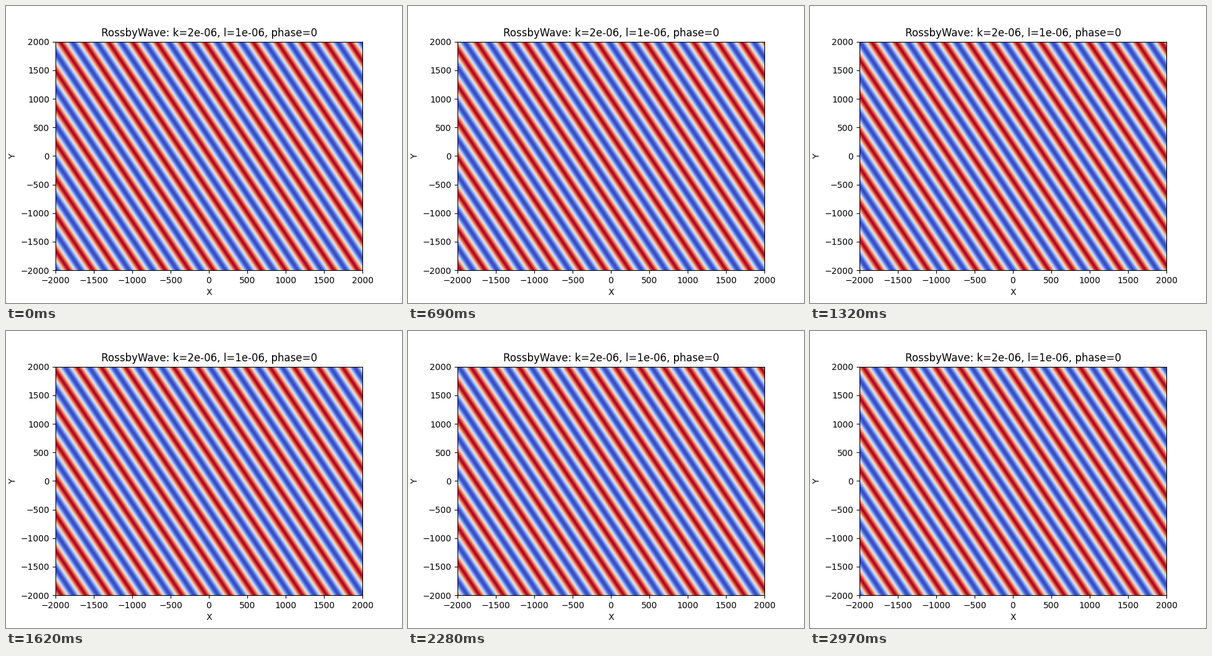
A matplotlib script for the animation above (3000 ms loop, 640 by 480 pixels).

```python
import numpy as np
import matplotlib.pyplot as plt
from matplotlib.animation import FuncAnimation

FRAMES, INTERVAL = 100, 30
HALF = 2000            # half width of the domain
K, L = 0.02, 0.01      # wavenumbers per axis unit
OMEGA = -0.384         # phase change per frame, westward

# Sample at cell centres, about one cell per pixel.
NX, NY = 496, 370
x = (np.arange(NX) + 0.5) / NX * 2 * HALF - HALF
y = (np.arange(NY) + 0.5) / NY * 2 * HALF - HALF
theta = K * x[None, :] + L * y[:, None]


def wave(i):
    return np.cos(theta - OMEGA * i)


fig, ax = plt.subplots(figsize=(6.4, 4.8), dpi=100)
im = ax.imshow(wave(0), cmap="coolwarm", vmin=-1, vmax=1, origin="lower",
               extent=(-HALF, HALF, -HALF, HALF), aspect="auto",
               interpolation="nearest")
ax.set_title("RossbyWave: k=2e-06, l=1e-06, phase=0")
ax.set_xlabel("X")
ax.set_ylabel("Y")
ticks = np.arange(-HALF, HALF + 1, 500)
ax.set_xticks(ticks)
ax.set_yticks(ticks)


def update(i):
    im.set_data(wave(i))
    return (im,)


anim = FuncAnimation(fig, update, frames=FRAMES, interval=INTERVAL,
                     repeat=True, repeat_delay=0, blit=False)
plt.show()
```
